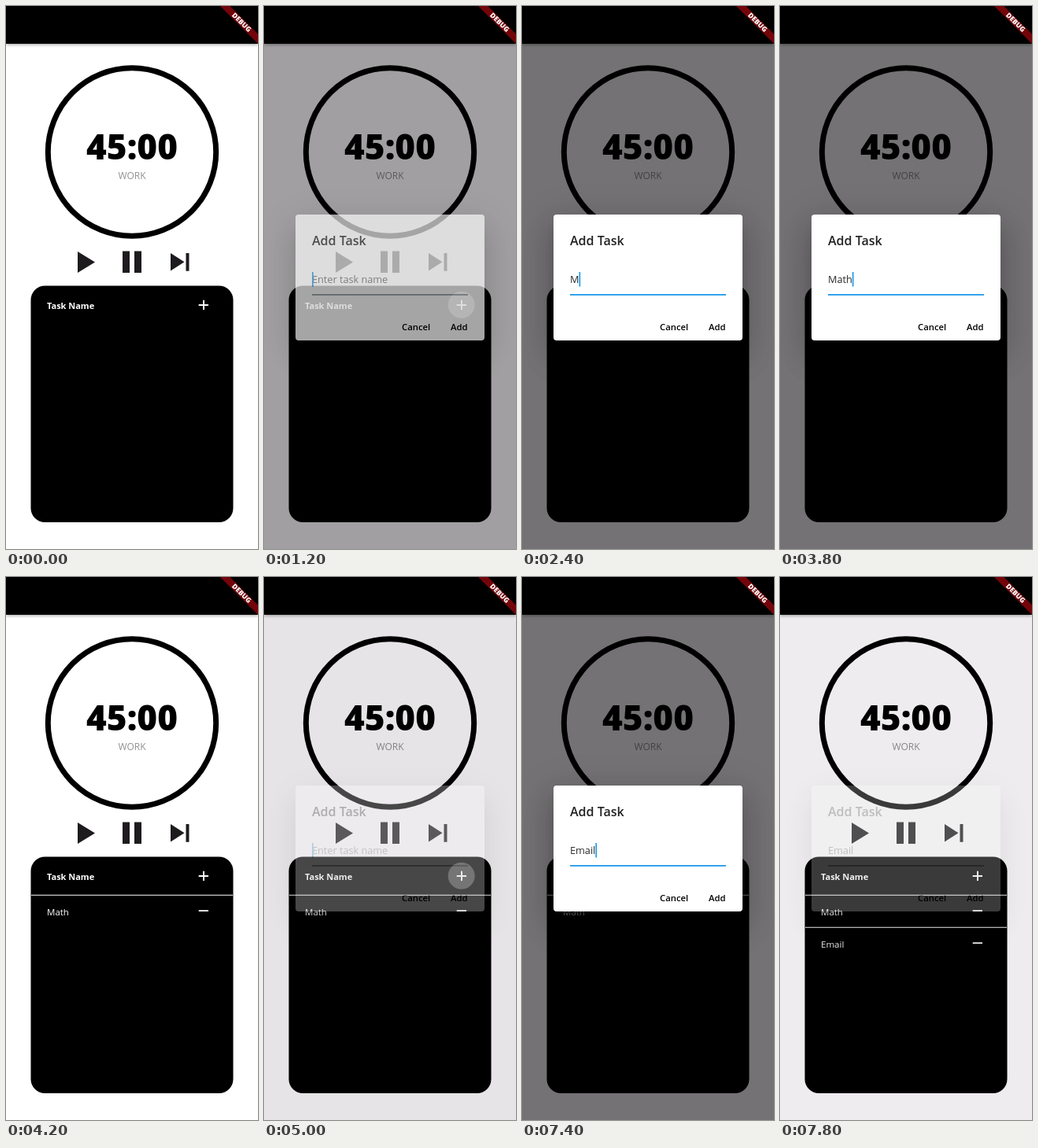
An HTML page that plays this animation: 320x690 px, repeating every 8 s.

```html
<!DOCTYPE html>
<html lang="en">
<head>
<meta charset="utf-8">
<title>Pomodoro tasks</title>
<style>
  html, body { margin: 0; width: 100%; height: 100%; overflow: hidden; background: #fff; }
  body { position: relative; }
  svg, div { position: absolute; left: 0; top: 0; }
  svg { width: 320px; height: 690px; font: 500 11.5px 'Open Sans', 'Noto Sans', sans-serif; }
  #page { background: #fff; }
  #bar { width: 320px; height: 47.6px; background: #000; box-shadow: 0 1px 4px rgba(0,0,0,.4); }
  #scrim { width: 320px; height: 690px; mix-blend-mode: multiply; }
  #card { left: 40px; top: 265px; width: 240px; height: 160px; border-radius: 4px; background: #fff;
    box-shadow: 0 11px 15px -7px rgba(0,0,0,.2), 0 24px 38px 3px rgba(0,0,0,.14), 0 9px 46px 8px rgba(0,0,0,.12); }
  .bold { font-weight: 700; font-size: 11px; }
  .action { font-weight: 600; font-size: 11.3px; fill: #000; }
</style>
</head>
<body>
<svg id="page">
  <circle cx="160" cy="185.500" r="106.700" fill="none" stroke="#000" stroke-width="7"/>
  <text x="160" y="195" text-anchor="middle" font-size="44" font-weight="800">45:00</text>
  <text x="160" y="219.500" text-anchor="middle" font-size="12" font-weight="400" fill="#929292">WORK</text>
  <path fill="#1d1b1e" d="M91 312l22 13.500l-22 13.500z M148 311.500h9v27.500h-9z M163 311.500h9v27.500h-9z
    M209 314l17.500 11.300l-17.500 11.300z M228.500 314h4v22.800h-4z"/>
  <rect x="31.500" y="355.500" width="257" height="300.500" rx="18"/>
  <circle id="ripple" cx="250.700" cy="379.700" r="17" fill="#fff" fill-opacity=".28"/>
  <g fill="#fff">
    <text class="bold" x="52" y="385">Task Name</text>
    <path d="M244.700 379h12.300v2h-12.300z M250 373.700h2v12.300h-2z"/>
    <g id="rows"></g>
  </g>
</svg>
<div id="bar"></div>
<div id="scrim"></div>
<div id="dialog">
  <div id="card"></div>
  <svg>
    <text x="61" y="304" font-size="16" font-weight="600" fill="#212121">Add Task</text>
    <text id="field" x="61" y="352" font-size="12.7" font-weight="400"></text>
    <rect id="caret" y="338" width="1.700" height="18.500" fill="#1f9bea"/>
    <rect id="line" x="61" y="366" width="198" height="1.800"/>
    <text class="action" x="175" y="411.500">Cancel</text>
    <text class="action" x="237" y="411.500">Add</text>
  </svg>
</div>
<svg>
  <g transform="translate(320 0) rotate(45)">
    <rect x="-34" y="25.300" width="68" height="8.700" fill="#73050a"/>
    <text y="32.400" text-anchor="middle" font-size="8.800" font-weight="800" fill="#fff">DEBUG</text>
  </g>
</svg>
<script>
const $ = id => document.getElementById(id);
const LOOP = 8000, STEP = 200;               // the screen refreshes five times a second
const FADE = 150, TYPING = 400, BLINK = 500;

const sessions = [
  { name: 'Math', open: 1134, type: 2400, close: 4000 },
  { name: 'Email', open: 4975, type: 6000, close: 7670 },
];

const clamp = v => Math.min(1, Math.max(0, v));
const easeOut = p => 1 - (1 - p) ** 1.8;
const ease = p => 1 - (1 - p ** 1.7) ** 4;

// Typing starts slowly with one letter and speeds up
function typedText({ name, type }, t) {
  if (t < type) return '';
  return name.slice(0, 1 + Math.floor((name.length - 1) * clamp((t - type) / TYPING) ** 2));
}

// The caret stays lit while typing and blinks when idle
function caretLit({ open, type, close }, t) {
  const idle = t < type ? t - open : Math.max(0, t - type - TYPING);
  return t < close && Math.floor(idle / BLINK) % 2 === 0;
}

const row = ({ name }, i) => `<g transform="translate(0 ${i * 41})">
  <path d="M32 403.700h256v1h-256z M244.700 423.200h12.300v1.800h-12.300z"/>
  <text x="52" y="429.500">${name}</text></g>`;

function draw(time) {
  const t = Math.floor(time / STEP) * STEP;
  const session = sessions.find(s => t < s.close + FADE) || sessions.at(-1);
  const shown = clamp(Math.min((t - session.open) / FADE, 1 - (t - session.close) / FADE));
  const fading = shown > 0 && shown < 1;
  const text = typedText(session, t);
  const dim = ease(shown), shade = 255 - 139 * dim;

  $('scrim').style.background = `rgb(${shade}, ${shade - 2 * (shown > 0)}, ${shade})`;
  $('dialog').style.opacity = easeOut(shown);
  $('ripple').style.opacity = +(fading && !text);
  $('rows').innerHTML = sessions.filter(s => t > s.close).map(row).join('');
  $('field').textContent = text || 'Enter task name';
  $('field').setAttribute('fill', text ? '#2b2b2b' : '#6a6a6a');
  $('caret').setAttribute('x', 61 + (text ? $('field').getComputedTextLength() : 0));
  $('caret').style.opacity = +caretLit(session, t);
  $('line').setAttribute('fill', fading ? '#98a3aa' : '#1f9bea');
}

const begin = performance.now();
function tick() {
  draw((performance.now() - begin) % LOOP);
  requestAnimationFrame(tick);
}
tick();
</script>
</body>
</html>
```
